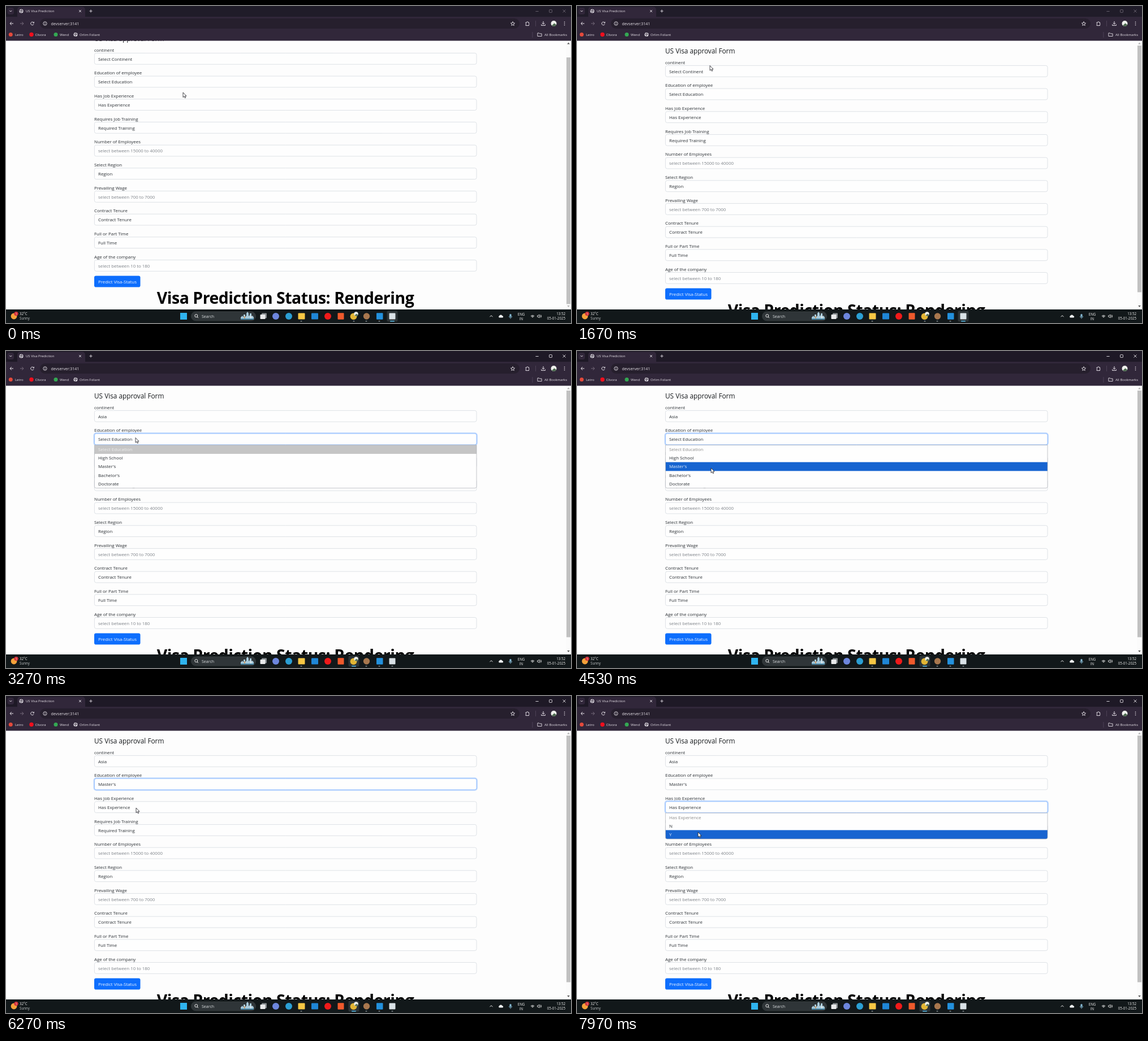
An HTML page with a canvas that plays this animation: 999 by 561 pixels, repeating every 8 s.

```html
<!DOCTYPE html>
<html lang="en">
<head>
<meta charset="utf-8">
<title>Visa form</title>
<style>
  html, body { margin: 0; width: 100%; height: 100%; overflow: hidden; background: #fdfdfd; }
  canvas { display: block; width: 999px; height: 561px; }
</style>
</head>
<body>
<canvas id="stage"></canvas>
<script>
const W = 999, H = 561, LOOP = 8000;
const PAGE_TOP = 61.5, BAR_TOP = 537, SCROLL = 22;
const LEFT = 156.4, RIGHT = 832, FIELD_H = 19.8, STEP = 40.68, FIRST = 105.4, ROW = 15.15;
const FACE = '"Open Sans", "Noto Sans", sans-serif';
const INK = '#2a2f34', PALE = '#e6e1e8', TOOLBAR = '#31273a';

const canvas = document.getElementById('stage');
const ctx = canvas.getContext('2d');
const dpr = window.devicePixelRatio || 1;
canvas.width = W * dpr;
canvas.height = H * dpr;

const fields = [
  { label: 'continent', value: 'Select Continent', picked: 'Asia', open: 2150, close: 2830,
    options: ['Asia', 'Africa', 'North America', 'Europe', 'South America', 'Oceania'] },
  { label: 'Education of employee', value: 'Select Education', picked: "Master's", open: 3180, close: 5050,
    options: ['High School', "Master's", "Bachelor's", 'Doctorate'] },
  { label: 'Has Job Experience', value: 'Has Experience', open: 6750, close: LOOP, options: ['N', 'Y'] },
  { label: 'Requires Job Training', value: 'Required Training' },
  { label: 'Number of Employees', hint: 'select between 15000 to 40000' },
  { label: 'Select Region', value: 'Region' },
  { label: 'Prevailing Wage', hint: 'select between 700 to 7000' },
  { label: 'Contract Tenure', value: 'Contract Tenure' },
  { label: 'Full or Part Time', value: 'Full Time' },
  { label: 'Age of the company', hint: 'select between 10 to 180' }
];

// time, x, y of the pointer tip
const path = [
  [0, 313, 153], [350, 313, 153], [900, 296, 140], [1450, 235, 105.5], [1700, 235, 105.5],
  [2000, 231, 116], [2220, 230, 118], [2400, 230, 135.5], [2480, 230, 135.5], [2700, 226, 149],
  [2850, 226, 149], [3100, 229, 153.5], [3350, 229, 153.5], [3750, 232, 187], [4300, 237, 207],
  [5100, 237, 207], [5900, 230, 198], [6800, 230, 198], [7200, 224, 229], [7600, 214, 241], [LOOP, 214, 241]
];

const ease = p => p * p * (3 - 2 * p);
const ramp = (t, a, b) => ease(Math.min(1, Math.max(0, (t - a) / (b - a))));

function pointerAt(t) {
  let i = 0;
  while (i < path.length - 2 && path[i + 1][0] <= t) i++;
  const [a, x0, y0] = path[i], [b, x1, y1] = path[i + 1];
  const p = ramp(t, a, b);
  return [x0 + (x1 - x0) * p, y0 + (y1 - y0) * p];
}

function text(s, x, y, size, color, align = 'left', weight = 400) {
  ctx.font = `${weight} ${size}px ${FACE}`;
  ctx.textAlign = align;
  ctx.fillStyle = color;
  ctx.fillText(s, x, y);
}
function rect(x, y, w, h, color) {
  ctx.fillStyle = color;
  ctx.fillRect(x, y, w, h);
}
function box(x, y, w, h, r, fill, stroke, width = 1) {
  ctx.beginPath();
  ctx.roundRect(x, y, w, h, r);
  if (fill) { ctx.fillStyle = fill; ctx.fill(); }
  if (stroke) { ctx.strokeStyle = stroke; ctx.lineWidth = width; ctx.stroke(); }
}
function dot(x, y, r, color) {
  ctx.beginPath();
  ctx.arc(x, y, r, 0, 7);
  ctx.fillStyle = color;
  ctx.fill();
}
function ring(x, y, r, color, from = 0, to = Math.PI * 2, width = 1) {
  ctx.beginPath();
  ctx.arc(x, y, r, from, to);
  ctx.strokeStyle = color;
  ctx.lineWidth = width;
  ctx.stroke();
}
// SVG path data drawn relative to (x, y)
function mark(x, y, d, color, width = 1, fill = false) {
  ctx.save();
  ctx.translate(x, y);
  const p = new Path2D(d);
  if (fill) {
    ctx.fillStyle = color;
    ctx.fill(p);
  } else {
    ctx.strokeStyle = color;
    ctx.lineWidth = width;
    ctx.stroke(p);
  }
  ctx.restore();
}
function globe(x, y) {
  dot(x, y, 3.6, '#d9d5dd');
  mark(x, y, 'M-3-1L-1-.5L0 1L-1 3M1-3L0-1.5L2 0L3 0', '#4a4150', 1.1);
}
function avatar(x, y, r) {
  dot(x, y, r, '#eef0ec');
  mark(x, y, `M${-r * .7} ${r * .7}L${r * .2} ${-r * .1}L${r * .9} ${r * .45}A${r} ${r} 0 0 1 ${-r * .7} ${r * .7}Z`, '#4d6b50', 1, true);
}

function drawForm(t) {
  text('US Visa approval Form', 156, 84.4, 11.8, '#16191c', 'left', 500);
  let focus = -1;
  fields.forEach((f, i) => { if (t >= f.open) focus = i; });
  fields.forEach((f, i) => {
    const y = FIRST + i * STEP, w = RIGHT - LEFT;
    text(f.label, 156, y - 2.8, 7.9, INK);
    if (i === focus) box(LEFT - .9, y - .9, w + 1.8, FIELD_H + 1.8, 4, null, '#c2dafe', 2);
    box(LEFT, y, w, FIELD_H, 3.1, '#fefefe', i === focus ? '#86b7fe' : '#dbdfe4', .9);
    const shown = f.picked && t >= f.close ? f.picked : f.value;
    text(shown || f.hint, 163, y + 13.2, 7.9, shown ? INK : '#7d8288');
  });
  box(156, 499.5, 81.5, 20, 3.1, '#0d6efd');
  text('Predict Visa-Status', 163, 512.9, 7.9, '#f3f7ff');
  ctx.letterSpacing = '-0.45px';
  text('Visa Prediction Status: Rendering', 494, 548.5, 28.4, '#000', 'center', 700);
  ctx.letterSpacing = '0px';
}

function drawMenu(t, py) {
  const i = fields.findIndex(f => t >= f.open && t < f.close);
  if (i < 0) return;
  const f = fields[i], rows = [f.value, ...f.options];
  const top = FIRST + i * STEP + FIELD_H + .5, h = rows.length * ROW + .5;
  const over = Math.floor((py - top) / ROW);
  const active = over > 0 && over < rows.length ? over : 0;
  ctx.save();
  ctx.beginPath();
  ctx.roundRect(LEFT, top, RIGHT - LEFT, h, [0, 0, 3, 3]);
  ctx.clip();
  rect(LEFT, top, RIGHT - LEFT, h, '#fefefe');
  rect(LEFT, top + active * ROW, RIGHT - LEFT, ROW + .5, active ? '#1764d0' : '#c5c5c5');
  ctx.restore();
  box(LEFT, top, RIGHT - LEFT, h, [0, 0, 3, 3], null, '#a9adb3', .7);
  rows.forEach((s, n) => {
    const color = n === active ? (n ? '#e8f0fc' : '#eeeeee') : (n ? INK : '#8a8a8a');
    text(s, 163, top + n * ROW + 10.8, 7.9, color);
  });
}

function drawScrollbar(p) {
  rect(990, PAGE_TOP, 9, BAR_TOP - PAGE_TOP, '#fbfbfb');
  rect(991, 91 - 21 * p, 7, 436.5, '#c1c1c1');
  mark(994.5, 66, 'M-2.3 1.5L0-1.5L2.3 1.5Z', p < 1 ? '#555' : '#b0b0b0', 1, true);
  mark(994.5, 531.5, 'M-2.3-1.5L0 1.5L2.3-1.5Z', p > 0 ? '#555' : '#b0b0b0', 1, true);
}

function drawBrowser(focused) {
  rect(0, 0, W, 20, focused ? '#1e1926' : '#201c29');
  rect(0, 19, W, PAGE_TOP - 19, TOOLBAR);
  box(20, 1.5, 120, 20, [5, 5, 0, 0], TOOLBAR);
  box(2.5, 3, 11.5, 12, 3.5, TOOLBAR);
  mark(8.3, 9, 'M-2-1L0 1L2-1', PALE);
  globe(27, 9);
  text('US Visa Prediction', 35, 11.2, 6, PALE);
  mark(131, 9, 'M-2-2L2 2M2-2L-2 2', PALE, .9);
  mark(150, 9, 'M-2.6 0H2.6M0-2.6V2.6', PALE, .9);
  const ctl = focused ? '#e4e0e6' : '#6d6672';
  mark(939, 9, 'M-2.6 .5H2.6', ctl, .9);
  box(960.6, 6.6, 4.8, 4.8, .6, null, ctl, .9);
  mark(987, 9, 'M-2.5-2.5L2.5 2.5M2.5-2.5L-2.5 2.5', ctl, .9);

  mark(10, 31, 'M3 0H-3M-.3-2.8L-3 0L-.3 2.8', PALE);
  mark(28, 31, 'M-3 0H3M.3-2.8L3 0L.3 2.8', '#776c7d');
  ring(46.5, 31, 2.8, PALE, .4, 5.6);
  mark(46.5, 31, 'M3.3-3.4V-.6H.5Z', PALE, 1, true);
  box(60, 22, 848, 18, 9, '#261f2d');
  ring(69, 31, 3.2, PALE, 0, 7, .9);
  mark(69, 31, 'M0-.4V1.9M0-1.8V-1', PALE, .9);
  text('devserver:3141', 79.5, 33.6, 7, PALE);
  mark(896, 31.2, 'M0-3.6L1-1.1L3.6-.9L1.6.8L2.2 3.3L0 1.9L-2.2 3.3L-1.6.8L-3.6-.9L-1-1.1Z', PALE, .9);
  mark(922, 31, 'M-3-2H-1A1.1 1.1 0 0 1 1.2-2H2.5V0A1.1 1.1 0 0 1 2.5 2V3.6H-3V1.7A1 1 0 0 0-3-.2Z', PALE);
  rect(936, 26, .8, 10, '#55485e');
  mark(950, 31, 'M0-4V1.2M-2.3-1L0 1.3L2.3-1M-3.4 1.5V3.4H3.4V1.5', PALE);
  avatar(968.5, 31, 5);
  for (let n = -1; n < 2; n++) dot(987.5, 31 + n * 2.7, .8, PALE);

  dot(8.3, 50.5, 3.5, '#e34a3c');
  text('Letro', 16, 52.7, 6, PALE);
  dot(45, 50.5, 3.7, '#f00f1e');
  text('Clivora', 51.5, 52.7, 6, PALE);
  dot(88, 50.5, 3.5, '#34a853');
  text('Wend', 95, 52.7, 6, PALE);
  globe(123, 50.5);
  text('Orlim Foliant', 130, 52.7, 6, PALE);
  rect(930.5, 46, .8, 10, '#55485e');
  mark(943.5, 50.7, 'M-3.6-2.8H-1L0-1.7H3.6V2.8H-3.6Z', PALE, .9);
  text('All Bookmarks', 952, 52.7, 6, PALE);
}

function drawTaskbar(focused) {
  rect(0, BAR_TOP, W, H - BAR_TOP, '#12181a');
  dot(14, 549, 5.4, '#f5a13a');
  dot(18, 544.6, 3.7, '#d5303a');
  text('1', 18, 546.6, 5.4, '#fff', 'center');
  text('32°C', 24, 547.2, 6.2, '#f0f0f0');
  text('Sunny', 24, 555.3, 6.2, '#c4c8ca');

  rect(308, 543, 12, 12, '#2fb4ef');
  box(327.5, 541, 114, 16, 8, '#2f3538', '#3d4346', .6);
  ring(336.3, 548.2, 2.5, '#eee');
  mark(338, 550, 'M0 0L2 2', '#eee');
  text('Search', 346, 551.5, 7, '#dcdfe1');
  mark(427, 549, 'M-12 4V2L-9-1L-7 2V-3H-4V1L-2-1V-5L0-8L2-5V0L4-2V-5H7V0L9-1L11 2V4Z', '#a9cbdc', 1, true);
  rect(415, 553, 23, 2, '#4f8fb0');
  rect(421, 549, 2, 4, '#c89a6a');
  rect(432, 548, 2, 5, '#dfe8ea');

  box(focused ? 605.5 : 673.5, 539.5, 19, 19, 2.5, '#2c3336');
  box(452, 543.5, 9, 9, 1, '#858b8f');
  box(449.5, 546, 9, 8, 1, '#e8eaeb');
  dot(477, 549, 6, '#6d86dd');
  dot(500, 549, 6, '#2b9fd4');
  box(516.5, 543.5, 12, 11, 1, '#f6c744');
  box(540, 543.5, 12, 11, 1, '#1f86d6');
  dot(569, 549, 6, '#f01a1a');
  box(586.5, 543.3, 11, 11.5, 1, '#ef5a2c');
  dot(614.5, 549.3, 5.9, '#e2b534');
  avatar(619, 545, 3.7);
  dot(637.5, 549, 5.7, '#a8774e');
  box(655, 543.3, 11.5, 11.5, 1, '#2391dd');
  box(677.5, 543.5, 11, 11, 1, '#d9e1e6');
  [522, 615, 637, 660, 683].forEach(x => {
    const on = x === (focused ? 615 : 683), w = on ? 8 : 3;
    box(x - w / 2, 557, w, 1.5, .7, on ? '#59c1ee' : '#888f93');
  });

  mark(858, 549, 'M-2.5 1.2L0-1.3L2.5 1.2', '#eee');
  mark(875, 549, 'M-3 2.5A2 2 0 0 1-2.7-1A3 3 0 0 1 2.6-.8A1.7 1.7 0 0 1 3 2.5Z', '#f0f2f3', 1, true);
  box(890.4, 545, 3.2, 5.5, 1.6, '#86b9d2');
  mark(892, 549, 'M-2.7 0A2.7 2.7 0 0 0 2.7 0M0 2.7V4.5', '#86b9d2', .8);
  text('ENG', 911, 547.6, 6.2, '#f0f0f0', 'center');
  text('IN', 911, 555.7, 6.2, '#f0f0f0', 'center');
  for (const r of [1.5, 3, 4.5]) ring(931, 552, r, '#eee', Math.PI * 1.25, Math.PI * 1.75, .9);
  mark(943, 549, 'M-3.5-1.2H-2L0-3V3L-2 1.2H-3.5Z', '#eee', .8);
  ring(943, 549, 2, '#eee', -.8, .8, .8);
  ring(943, 549, 3.6, '#eee', -.8, .8, .8);
  text('13:52', 989, 547.2, 6.2, '#f0f0f0', 'right');
  text('05-01-2025', 989, 555.4, 6.2, '#f0f0f0', 'right');
}

function drawPointer(x, y) {
  const d = 'M0 0V8.6L2 6.8L3.4 9.8L4.8 9.1L3.5 6.3H6Z';
  mark(x, y, d, '#fff', 1, true);
  mark(x, y, d, '#1c1c22', .8);
}

function draw(t) {
  const [x, y] = pointerAt(t);
  const p = ramp(t, 700, 920), focused = t >= fields[0].open;
  ctx.setTransform(dpr, 0, 0, dpr, 0, 0);
  rect(0, 0, W, H, '#fdfdfd');
  ctx.save();
  ctx.translate(0, -SCROLL * (1 - p));
  drawForm(t);
  drawMenu(t, y);
  ctx.restore();
  drawScrollbar(p);
  drawBrowser(focused);
  drawTaskbar(focused);
  drawPointer(x, y);
}

const start = performance.now();
function frame() {
  draw((performance.now() - start) % LOOP);
  requestAnimationFrame(frame);
}
frame();
</script>
</body>
</html>
```
